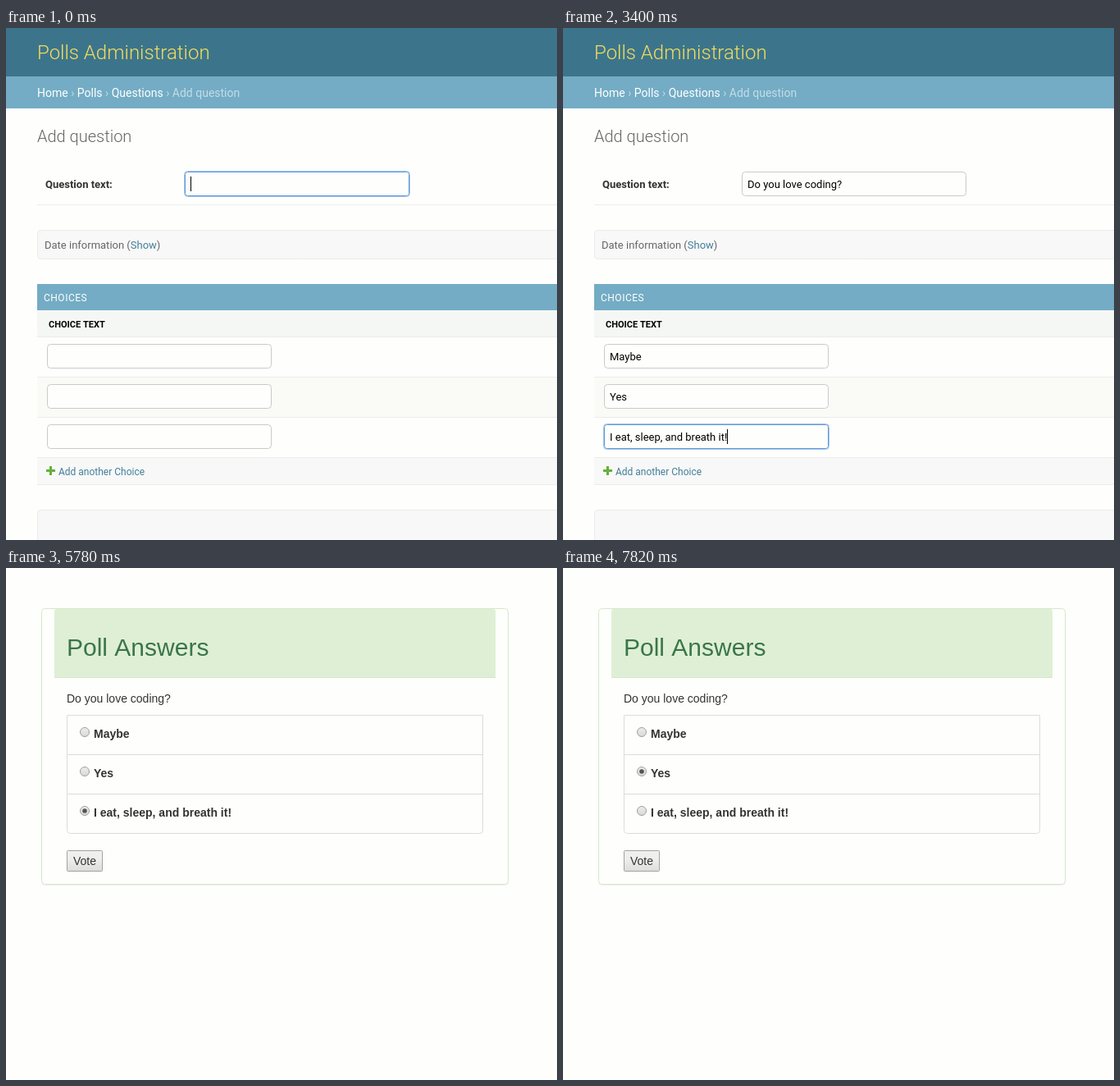
Recreate the animation shown at these times as an HTML page with a canvas. Size 672 px wide and 624 px high, loop 8000 ms.

```html
<!DOCTYPE html>
<html lang="en">
<head>
<meta charset="utf-8">
<title>Polls</title>
<style>
html, body { margin: 0; width: 100%; height: 100%; overflow: hidden; background: #fefefd; }
canvas { display: block; }
</style>
</head>
<body>
<canvas id="stage" width="672" height="624"></canvas>
<script>
const ctx = document.getElementById('stage').getContext('2d');
const LOOP = 8000, STEP = 340;
const PAPER = '#fefefd', TINT = '#f7f8f7', RULE = '#ececea', GREY = '#dcdddb';
const LINK = '#447e9b', BLUE = '#73acc4';
const admin = (size, weight = 400) => `${weight} ${size}px Roboto, sans-serif`;
const site = (size, weight = 400) => `${weight} ${size}px "Liberation Sans", Arial, sans-serif`;

function rect(x, y, w, h, color) {
  ctx.fillStyle = color;
  ctx.fillRect(x, y, w, h);
}

function box(x, y, w, h, radius, stroke, fill) {
  ctx.beginPath();
  ctx.roundRect(x + 0.5, y + 0.5, w - 1, h - 1, radius);
  if (fill) { ctx.fillStyle = fill; ctx.fill(); }
  ctx.lineWidth = 1;
  ctx.strokeStyle = stroke;
  ctx.stroke();
}

// Draws text and returns the x where it ends.
function text(str, x, y, font, color, spacing = 0) {
  ctx.font = font;
  ctx.letterSpacing = spacing + 'px';
  ctx.fillStyle = color;
  ctx.fillText(str, x, y);
  return x + ctx.measureText(str).width;
}

function link(str, x, y, color, hover) {
  const end = text(str, x, y, site(14), hover ? '#23527c' : color);
  if (hover) rect(x, y + 1, Math.round(end - x), 1, '#23527c');
}

/* Admin form */

const fields = [[218, 175], [50, 385], [50, 434], [50, 483]];
const answers = ['Do you love coding?', 'Maybe', 'Yes', 'I eat, sleep, and breath it!'];
// Per step: active field, letters typed, caret visible
const typing = [
  [0, 0, 1], [0, 1, 1], [0, 8, 0], [0, 16, 1], [0, 19, 1],
  [1, 5, 1], [2, 3, 1],
  [3, 3, 0], [3, 11, 0], [3, 28, 0], [3, 28, 1]
];

function field(i, active, typed, caret) {
  const [x, y] = fields[i];
  const focused = i === active;
  const value = i < active ? answers[i] : focused ? answers[i].slice(0, typed) : '';
  if (focused) {
    box(x - 1, y - 1, 276, 32, 4, '#a3c5ea');
    box(x, y, 274, 30, 3, '#5f99d6', PAPER);
  } else {
    box(x, y, 274, 30, 4, '#c9cac9', PAPER);
  }
  const end = text(value, x + 7, y + 20, admin(13), '#000');
  if (focused && caret) rect(Math.round(end), y + 6, 1, 18, '#000');
}

function drawForm(step) {
  rect(0, 0, 672, 59, '#3c758b');
  text('Polls Administration', 38, 38, admin(24, 300), '#f5dd5d');
  rect(0, 59, 672, 39, BLUE);
  let x = 38;
  for (const crumb of ['Home', 'Polls', 'Questions']) {
    x = text(crumb, x, 84, admin(14), '#fff');
    x = text(' › ', x, 84, admin(14), '#c4dce8');
  }
  text('Add question', x, 84, admin(14), '#c4dce8');

  text('Add question', 38, 139, admin(20, 300), '#666');
  text('Question text:', 48, 195, admin(13, 700), '#333');
  rect(38, 215, 634, 1, RULE);

  box(38, 246, 650, 36, 4, RULE, TINT);
  x = text('Date information (', 47, 269, admin(13), '#666');
  x = text('Show', x, 269, admin(13), LINK);
  text(')', x, 269, admin(13), '#666');

  rect(38, 312, 634, 32, BLUE);
  text('CHOICES', 46, 333, admin(12), '#fff', 0.5);
  rect(38, 344, 634, 32, '#f5f7f5');
  text('CHOICE TEXT', 52, 365, admin(11, 700), '#000');
  rect(38, 426, 634, 48, '#fafaf7');
  rect(38, 524, 634, 32, TINT);
  for (const y of [376, 425, 474, 523, 556]) rect(38, y, 634, 1, RULE);

  rect(49, 538, 11, 3, '#65b03a');
  rect(53, 534, 3, 11, '#65b03a');
  text('Add another Choice', 64, 545, admin(12), LINK);
  box(38, 587, 650, 60, 4, RULE, TINT);

  fields.forEach((_, i) => field(i, ...typing[step]));
}

/* Poll pages */

function panel(title, bottom) {
  box(43, 50, 570, bottom - 49, 4, '#eeefec');
  box(43, 49, 570, bottom - 49, 4, '#d6e9c6', PAPER);
  ctx.beginPath();
  ctx.roundRect(59, 50, 538, 84, [3, 3, 0, 0]);
  ctx.fillStyle = '#dfefd5';
  ctx.fill();
  rect(59, 133, 538, 1, '#d6e5cc');
  text(title, 74, 107, site(30), '#3a7648');
}

function drawQuestions(hover) {
  panel('Poll Questions', 418);
  const list = [
    'What was your first programming language?',
    'What was the first app you ever built?',
    'What was your first technology job?',
    answers[0]
  ];
  list.forEach((q, i) => {
    link(q, 89, 169 + 71 * i, '#555', i === hover);
    if (i) rect(59, 133 + 71 * i, 538, 1, GREY);
  });
}

function radio(x, y, on) {
  const shade = ctx.createLinearGradient(0, y - 6, 0, y + 6);
  shade.addColorStop(0, '#eeeeed');
  shade.addColorStop(1, '#d8d8d7');
  ctx.beginPath();
  ctx.arc(x, y, 5.5, 0, 7);
  ctx.fillStyle = shade;
  ctx.fill();
  ctx.strokeStyle = '#a0a09f';
  ctx.lineWidth = 1;
  ctx.stroke();
  if (!on) return;
  ctx.beginPath();
  ctx.arc(x, y, 2.8, 0, 7);
  ctx.fillStyle = '#555';
  ctx.fill();
}

// Border colour and gradient from top to bottom
const buttonLooks = {
  idle: ['#a2a2a1', '#efefee', '#dcdcdb'],
  hover: ['#8a8a89', '#f4f4f3', '#e2e2e1'],
  down: ['#8a8a89', '#d8d8d7', '#e6e6e5']
};

function voteButton(look) {
  const [edge, top, base] = buttonLooks[look];
  const shade = ctx.createLinearGradient(0, 344, 0, 370);
  shade.addColorStop(0.38, top);
  shade.addColorStop(1, base);
  box(74, 344, 44, 26, 1, edge, shade);
  text('Vote', 82, 362, site(14), '#333');
}

function drawAnswers(chosen, look) {
  panel('Poll Answers', 386);
  text(answers[0], 74, 164, site(14), '#333');
  box(74, 179, 508, 145, [0, 0, 4, 4], GREY);
  for (let i = 0; i < 3; i++) {
    const y = 179 + 48 * i;
    if (i) rect(75, y, 506, 1, GREY);
    radio(96, y + 21, i === chosen);
    text(answers[i + 1], 107, y + 28, site(14, 700), '#333');
  }
  voteButton(look);
}

function drawResults(hover) {
  panel('Poll Results', 447);
  text(answers[0], 74, 174, site(18), '#333');
  box(74, 188, 508, 184, [4, 4, 0, 0], GREY);
  ['0 votes', '0 votes', '1 vote'].forEach((count, i) => {
    const y = 188 + 61 * i;
    if (i) rect(75, y, 506, 1, GREY);
    text(answers[i + 1], 90, y + 26, site(14), '#333');
    text(count, 90, y + 46, site(14, 700), '#333');
  });
  link('Vote again?', 74, 406, '#337ab7', hover);
}

function draw(time) {
  const step = Math.floor((time % LOOP) / STEP);
  rect(0, 0, 672, 624, PAPER);
  if (step < 11) drawForm(step);
  else if (step < 17) drawQuestions(Math.min(step - 12, 3));
  else if (step < 21) drawAnswers(2, ['idle', 'hover', 'down', 'down'][step - 17]);
  else if (step < 23) drawResults(step === 22);
  else drawAnswers(1, 'idle');
}

const start = performance.now();
function tick() {
  draw(performance.now() - start);
  requestAnimationFrame(tick);
}
tick();
</script>
</body>
</html>
```
